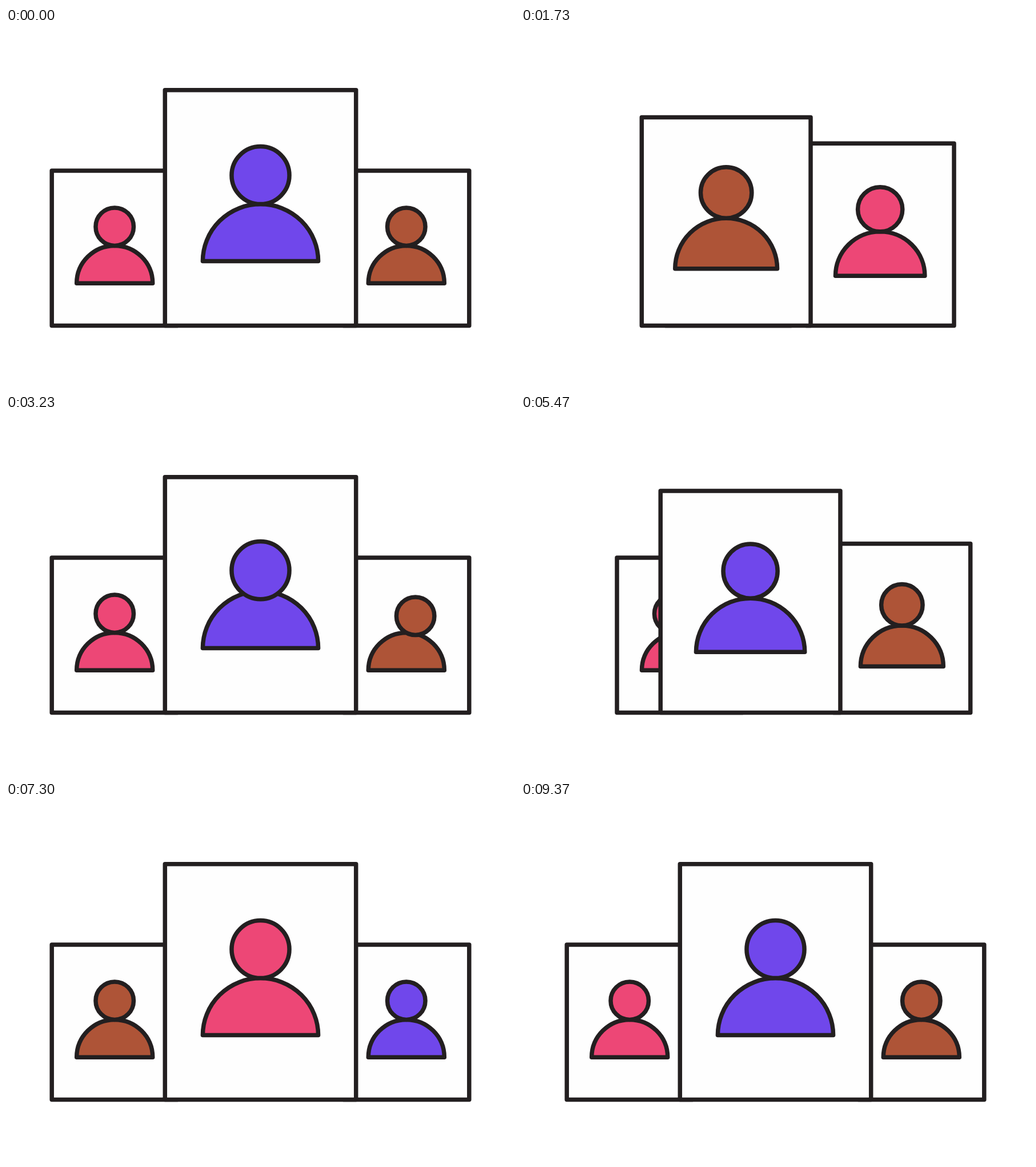
Recreate the animation shown at these times as an HTML page with a canvas. Size 891x629 px, loop 9610 ms.

```html
<!DOCTYPE html>
<html lang="en">
<head>
<meta charset="utf-8">
<title>Card carousel</title>
<style>
  html, body { margin: 0; width: 100%; height: 100%; overflow: hidden; background: #fff; }
  canvas { display: block; width: 891px; height: 629px; }
</style>
</head>
<body>
<canvas id="stage"></canvas>
<script>
const W = 891, H = 629, MIDDLE = 445.5, SPREAD = 255.3, FLOOR = 521.5;
const LOOP = 9610, ROUND = 4800, FRAME = 100 / 3;
const TURN_START = 501, TURN_EVERY = 1000, TURN = 565;
const ZOOM = 1.52, MAX_TILT = 0.76, CARD_LAG = 20, HEAD_LAG = 11;
const INK = '#231f20';

// Every card visits left, right, centre in this order
const SIDES = [-1, 1, 0];
const COLORS = ['#ed4776', '#ae5437', '#7047eb'];

const canvas = document.getElementById('stage');
const ctx = canvas.getContext('2d');
const ratio = window.devicePixelRatio || 1;
canvas.width = W * ratio;
canvas.height = H * ratio;
ctx.scale(ratio, ratio);
ctx.lineWidth = 7.5;
ctx.lineJoin = 'round';
ctx.strokeStyle = INK;

const mix = (a, b, p) => a + (b - a) * p;

function ease(time, start, length) {
  const x = Math.min(1, Math.max(0, (time - start) / length));
  return x < 0.5 ? 2 * x * x : 1 - 2 * (1 - x) ** 2;
}

// Heads lean away from the neck: right one first, then left, while the centre nods
function headMove(side, time, r) {
  const out = ease(time, 3067, 285);
  const swap = ease(time, 3501, 460);
  const rest = ease(time, 4080, 460);
  const right = out - swap, left = swap - rest;
  if (side === 0) return { dx: 0, dy: 21.5 * right - 19 * left };
  const tilt = MAX_TILT * (side > 0 ? right : -left);
  return { dx: r * Math.sin(tilt), dy: r * (1 - Math.cos(tilt)) };
}

function cardAt(color, seat, time) {
  const turn = Math.min(2, Math.max(0, Math.floor((time - TURN_START) / TURN_EVERY)));
  const from = SIDES[(seat + turn) % 3], to = SIDES[(seat + turn + 1) % 3];
  const progress = lag => ease(time - lag, TURN_START + turn * TURN_EVERY, TURN);
  const xAt = lag => MIDDLE + SPREAD * mix(from, to, progress(lag));

  const zoomAt = side => side === 0 ? ZOOM : 1;
  const scale = mix(zoomAt(from), zoomAt(to), progress(0));
  const x = xAt(to === 0 ? CARD_LAG : 0);
  const r = 66.5 * scale, headR = r / 2;
  const headY = FLOOR - 173.3 * scale;
  const { dx, dy } = headMove(to, time, headR);
  return {
    color, x, r, headR, scale,
    base: FLOOR - 74.3 * scale,
    neck: headY + headR,
    headX: (to === 1 ? xAt(HEAD_LAG) : x) + dx,
    headY: headY + dy,
    depth: to === 1 ? 0 : scale
  };
}

function paint(fill) {
  ctx.fillStyle = fill;
  ctx.fill();
  ctx.stroke();
}

function drawCard({ color, x, r, headR, scale, base, neck, headX, headY }) {
  const width = 220 * scale, height = 271.6 * scale;
  ctx.beginPath();
  ctx.rect(x - width / 2, FLOOR - height, width, height);
  paint('#fefefe');

  ctx.beginPath();
  ctx.ellipse(x, base, r, base - neck, 0, Math.PI, 2 * Math.PI);
  ctx.closePath();
  paint(color);

  ctx.beginPath();
  ctx.arc(headX, headY, headR, 0, 2 * Math.PI);
  paint(color);
}

function render(now) {
  const local = now % LOOP < ROUND ? now % LOOP : now % LOOP - ROUND;
  const time = Math.floor((local + 4) / FRAME) * FRAME;

  ctx.fillStyle = '#fff';
  ctx.fillRect(0, 0, W, H);
  COLORS
    .map((color, seat) => cardAt(color, seat, time))
    .sort((a, b) => a.depth - b.depth)
    .forEach(drawCard);
}

let origin;
function tick(now) {
  origin ??= now;
  render(now - origin);
  requestAnimationFrame(tick);
}
render(0);
requestAnimationFrame(tick);
</script>
</body>
</html>
```
